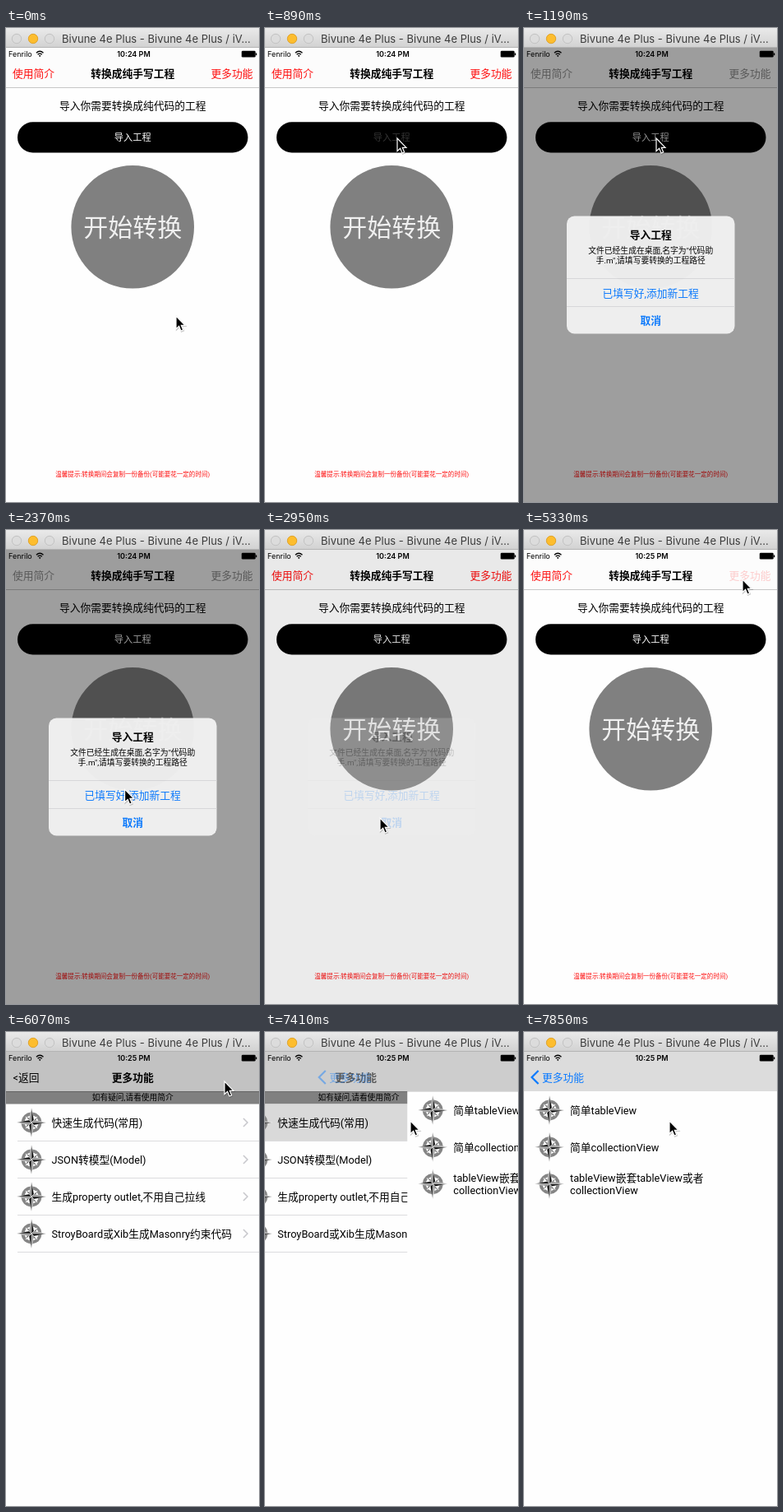
Write an HTML page that moves like this. It is 308 by 576 pixels and loops after 8 s.

```html
<!DOCTYPE html>
<html lang="zh-CN">
<head>
<meta charset="utf-8">
<title>转换成纯手写工程</title>
<style>
html, body { margin: 0; width: 100%; height: 100%; overflow: hidden; background: #fff; }
svg { display: block; width: 308px; height: 576px; }
text { font-family: Roboto, "Noto Sans CJK SC", "Noto Sans CJK", sans-serif; white-space: pre; }
.system { font-family: Inter, Roboto, sans-serif; }
</style>
</head>
<body>
<svg viewBox="0 0 308 576" xmlns="http://www.w3.org/2000/svg">
  <defs>
    <linearGradient id="chrome" x2="0" y2="1">
      <stop stop-color="#eaeaea"/><stop offset="1" stop-color="#d1d1d1"/>
    </linearGradient>
    <path id="arrow" d="M0 0V15.6L3.6 12.3L6 18L8.7 16.9L6.3 11.3H11Z"/>
    <g id="compass">
      <circle r="10.5" fill="none" stroke="#858585" stroke-width="4" stroke-dasharray="14.5 2" stroke-dashoffset="-1"/>
      <g id="rose"></g>
    </g>
  </defs>

  <g id="pages"></g>
  <rect id="bar" y="24" width="308" height="48"/>
  <path id="hairline" d="M0 72.5H308" stroke="#000" stroke-opacity=".22"/>
  <g id="navs"></g>

  <g id="status">
    <path d="M36.9 30.2Q41.2 26.4 45.5 30.2M38.6 32.2Q41.2 30 43.8 32.2" fill="none" stroke="#000" stroke-width="1.3"/>
    <path d="M39.9 33.6Q41.2 32.6 42.5 33.6L41.2 35.2Z"/>
    <rect x="286.8" y="27.8" width="16.9" height="7.8" rx="1.3"/>
    <rect x="304" y="30.3" width="1.3" height="3" rx=".6"/>
  </g>

  <rect id="dim" y="24" width="308" height="552"/>
  <g id="alert">
    <rect x="52" y="228.5" width="204.5" height="143" rx="9.5" fill="#f1f1f1"/>
    <path d="M52 304.5H256.5M52 338.5H256.5" stroke="#d9d9db"/>
  </g>

  <g id="chromeBar">
    <rect width="308" height="24" fill="url(#chrome)"/>
    <path d="M0 23.5H308" stroke="#b4b4b4"/>
    <g stroke="#c3c3c3" fill="#dcdcdc">
      <circle cx="13" cy="13" r="5.7"/>
      <circle cx="33" cy="13" r="5.7" fill="#fdbd2e" stroke="#e0a32a"/>
      <circle cx="53" cy="13" r="5.7"/>
    </g>
  </g>

  <g id="cursor">
    <use href="#arrow" x=".6" y="1" opacity=".2" stroke="#000" stroke-width="1.6"/>
    <use href="#arrow" stroke="#fff" stroke-width="1.2"/>
  </g>
</svg>
<script>
const LOOP = 8000, BEAT = 148, WIDTH = 308, BODY = 12.75, NAV_Y = 55.1;
const RED = '#fe0d0d', BLUE = '#0a7aff';
const $ = id => document.getElementById(id);

function set(node, attrs) {
  for (const key in attrs) node.setAttribute(key, attrs[key]);
  return node;
}
const add = (parent, tag, attrs = {}) =>
  parent.appendChild(set(document.createElementNS('http://www.w3.org/2000/svg', tag), attrs));

// cy is the vertical middle of the characters
function label(parent, x, cy, size, string, attrs = {}) {
  const node = add(parent, 'text', { x, y: cy + size * 0.37, 'font-size': size, ...attrs });
  node.textContent = string;
  return node;
}
const centred = (parent, cy, size, string, attrs = {}) =>
  label(parent, 154.2, cy, size, string, { 'text-anchor': 'middle', ...attrs });
const heading = (parent, cy, string, attrs = {}) =>
  centred(parent, cy, BODY, string, { 'font-weight': 600, ...attrs });
const compass = (page, y) => add(page, 'use', { href: '#compass', transform: `translate(31 ${y})` });

function star(turn, reach, dark, light) {
  for (let i = 0; i < 4; i++) {
    const arm = add($('rose'), 'g', { transform: `rotate(${turn + i * 90})`, stroke: '#fff', 'stroke-width': 0.3 });
    add(arm, 'path', { d: `M0 0V${-reach}L3 -3Z`, fill: dark });
    add(arm, 'path', { d: `M0 0V${-reach}L-3 -3Z`, fill: light });
  }
}
star(45, 10, '#555', '#fff');
star(0, 17.8, '#0c0c0c', '#999');

const pages = [0, 1, 2].map(() => add($('pages'), 'g'));
const navs = pages.map(() => add($('navs'), 'g'));
pages.forEach(page => add(page, 'rect', { y: 24, width: WIDTH, height: 552, fill: '#fefefe' }));
const [home, list, detail] = pages;

// Home
centred(home, 94.7, BODY, '导入你需要转换成纯代码的工程');
add(home, 'rect', { x: 14, y: 114.3, width: 280.5, height: 37.2, rx: 18.6 });
const importText = centred(home, 132.8, 11.2, '导入工程', { fill: '#fff' });
add(home, 'circle', { cx: 154.2, cy: 241.8, r: 74.8, fill: '#808080' });
centred(home, 241.5, 30, '开始转换', { fill: '#f0f0f0', 'font-weight': 350 });
centred(home, 542.3, 7.54, '温馨提示:转换期间会复制一份备份(可能要花一定的时间)', { fill: RED });
const guide = label(navs[0], 8, NAV_Y, BODY, '使用简介');
heading(navs[0], NAV_Y, '转换成纯手写工程');
const more = label(navs[0], 300.5, NAV_Y, BODY, '更多功能', { 'text-anchor': 'end' });

// Feature list
add(list, 'rect', { y: 72, width: WIDTH, height: 15.5, fill: '#808080' });
centred(list, 79.7, 9.7, '如有疑问,请看使用简介');
const highlight = add(list, 'rect', { y: 87.5, width: WIDTH, height: 45, fill: '#d9d9d9' });
['快速生成代码(常用)', 'JSON转模型(Model)', '生成property outlet,不用自己拉线', 'StroyBoard或Xib生成Masonry约束代码']
  .forEach((name, i) => {
    const y = 110 + i * 45;
    compass(list, y);
    label(list, 55.5, y + 0.3, BODY, name);
    add(list, 'path', { d: `M289 ${y - 5}l5 5l-5 5`, fill: 'none', stroke: '#c7c7cc', 'stroke-width': 1.5 });
    add(list, 'path', { d: `M14 ${y + 22.5}H308`, stroke: '#dcdcde' });
  });
label(navs[1], 8.5, NAV_Y, BODY, '<返回');
heading(navs[1], NAV_Y, '更多功能');

// Detail list
[['简单tableView'], ['简单collectionView'], ['tableView嵌套tableView或者', 'collectionView']].forEach((lines, i) => {
  const y = 95 + i * 44.8;
  compass(detail, y);
  lines.forEach((line, n) => label(detail, 56, y + (n - (lines.length - 1) / 2) * 15, BODY, line));
});
add(navs[2], 'path', { d: 'M17.5 47L9.5 55L17.5 63', fill: 'none', stroke: BLUE, 'stroke-width': 2.2 });
label(navs[2], 22, NAV_Y, BODY, '更多功能', { fill: BLUE });

// Alert
const alertBox = $('alert');
heading(alertBox, 251.3, '导入工程');
centred(alertBox, 270.8, 9.8, '文件已经生成在桌面,名字为"代码助');
centred(alertBox, 282.8, 9.8, '手.m",请填写要转换的工程路径');
centred(alertBox, 321.8, BODY, '已填写好,添加新工程', { fill: BLUE });
heading(alertBox, 355.2, '取消', { fill: BLUE });

// Window and status bar
label($('chromeBar'), 68, 13.2, 13, 'Bivune 4e Plus - Bivune 4e Plus / iV...', { class: 'system', fill: '#3c3c3c' });
label($('status'), 3, 31.8, 9, 'Fenrilo', { class: 'system' });
const clock = label($('status'), 155.5, 31.8, 9, '', { class: 'system', 'font-weight': 600, 'text-anchor': 'middle' });

const progress = (beat, from, to) => Math.min(1, Math.max(0, (beat - from) / (to - from)));
const smooth = p => p * p * (3 - 2 * p);
const easeOut = (beat, from, to) => 1 - (1 - progress(beat, from, to)) ** 2;

// Pointer moves: first beat, last beat, destination
const moves = [
  [0, 5, 161, 134], [8, 12, 153, 251], [13, 18, 140, 350], [20, 23, 166, 247],
  [25, 28, 156, 111], [28, 35, 266, 60], [41, 47, 177, 108]
];
function pointer(beat) {
  let x = 207, y = 350;
  for (const [from, to, endX, endY] of moves) {
    const p = smooth(progress(beat, from, to));
    x += (endX - x) * p;
    y += (endY - y) * p;
  }
  return `translate(${x} ${y})`;
}

function place(i, enter, leave) {
  const shown = enter > 0 && leave < 1;
  set(pages[i], {
    visibility: shown ? 'visible' : 'hidden',
    transform: `translate(${WIDTH * (1 - enter) - 92 * leave} 0)`
  });
  set(navs[i], { opacity: enter * (1 - leave), transform: `translate(${100 * (1 - enter - leave)} 0)` });
}

function draw(beat) {
  const opened = easeOut(beat, 6, 8), closed = easeOut(beat, 19, 20.8);
  const toList = easeOut(beat, 37, 41), toDetail = easeOut(beat, 49, 53);
  const alertShown = opened * (1 - closed);
  const scale = 1.2 - 0.2 * opened;
  const tint = beat > 6 && beat < 20 ? '#8e8e8e' : RED;
  const grey = Math.round(252 - 58 * toList + 26 * toDetail);

  set($('cursor'), { transform: pointer(beat) });
  set($('dim'), { opacity: 0.38 * alertShown });
  set(alertBox, {
    opacity: 0.97 * alertShown,
    transform: `translate(154.2 300) scale(${scale}) translate(-154.2 -300)`
  });
  set(importText, { opacity: beat < 6 ? 1 : 0.2 + 0.8 * easeOut(beat, 6, 9) });
  set(guide, { fill: tint });
  set(more, { fill: tint, opacity: beat < 36 ? 1 : 0.2 });
  set(highlight, { opacity: beat < 50 ? 0 : 1 });
  set($('bar'), { fill: `rgb(${grey},${grey},${grey})` });
  set($('hairline'), { opacity: 1 - toDetail });
  clock.textContent = beat < 23 ? '10:24 PM' : '10:25 PM';

  place(0, 1, toList);
  place(1, toList, toDetail);
  place(2, toDetail, 0);
}

const start = performance.now();
function tick() {
  const time = (performance.now() - start) % LOOP;
  draw(Math.floor((time + 12) / BEAT));
  requestAnimationFrame(tick);
}
tick();
</script>
</body>
</html>
```
